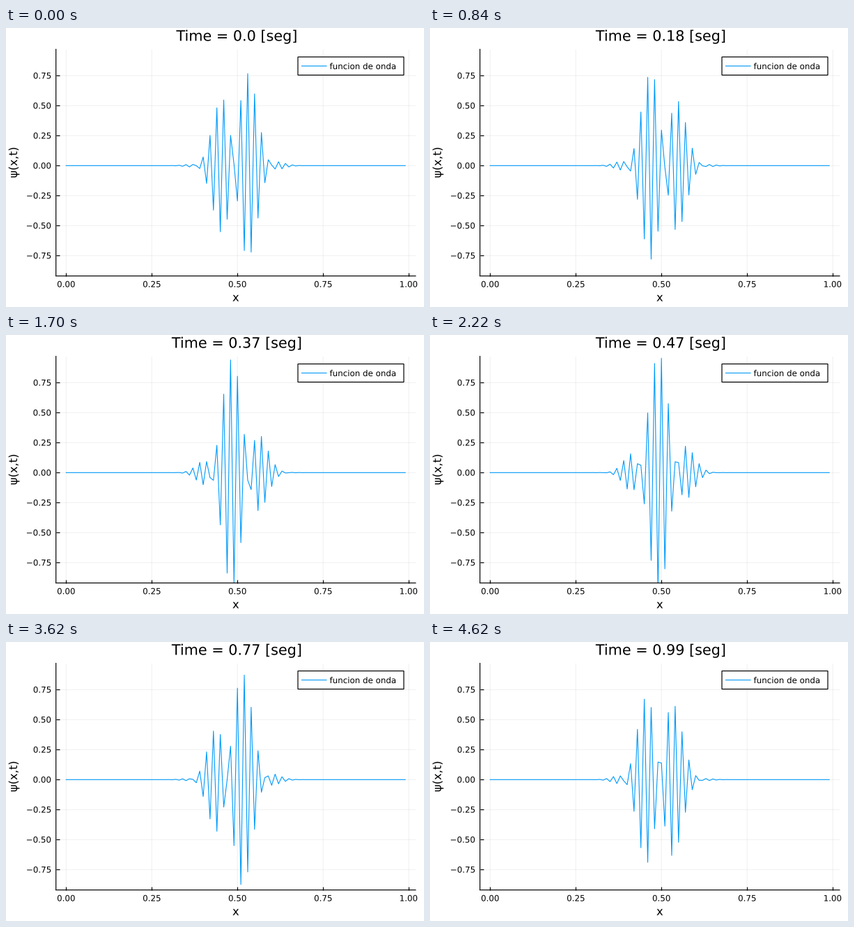
Recreate the animation shown at these times as a matplotlib script. Size 600x400 px, loop 4.64 s.

```python
import numpy as np
import matplotlib.pyplot as plt
from matplotlib.animation import FuncAnimation
from matplotlib.lines import Line2D
from matplotlib.patches import PathPatch, Rectangle
from matplotlib.textpath import TextPath
from matplotlib.transforms import Affine2D

W, H, DPI = 600, 400, 100
PX = 72 / DPI  # points per pixel
BLUE = "#009afa"
TICK_SIZE, GUIDE_SIZE, TITLE_SIZE = 11.85, 16.3, 20.75

# Plot box and data scale, in pixels
LEFT, RIGHT, TOP, BOTTOM = 71.7, 587.9, 30.5, 355.5
X0, X_SCALE = 86.3, 491.8
Y0, Y_SCALE = 197.3, 172.0

# Wave packet, in grid steps and seconds
CENTER, SIGMA = 50, 5.0
WAVENUMBER = np.pi + 0.288
PHASE, OMEGA = 1.87, 3.333
DRIFT, CHIRP = -0.7, -0.0019

plt.rcParams["font.family"] = "DejaVu Sans"
plt.rcParams["path.snap"] = False
n = np.arange(100)
x = n / 100


def wave(t):
    m = n - CENTER
    d = m - DRIFT * t
    angle = WAVENUMBER * m + PHASE - OMEGA * t + CHIRP * t * d**2
    return np.exp(-d**2 / (2 * SIGMA**2)) * np.cos(angle)


def text_path(px, py, s, size, align=0.5, angle=0):
    """Outline of s; align 0, 0.5 or 1 puts its left, middle or right at px."""
    path = TextPath((0, 0), s, size=size)
    box = path.get_extents()
    shift = box.x0 + align * box.width
    place = Affine2D().translate(-shift, 0).rotate_deg(angle).translate(px, H - py)
    return place.transform_path(path)


def label(*args, **kw):
    patch = PathPatch(text_path(*args, **kw), facecolor="black", linewidth=0,
                      transform=pixels, zorder=4)
    return fig.add_artist(patch)


fig = plt.figure(figsize=(W / DPI, H / DPI), dpi=DPI, facecolor="white")
pixels = Affine2D().scale(1 / W, 1 / H) + fig.transFigure

ax = fig.add_axes([LEFT / W, 1 - BOTTOM / H, (RIGHT - LEFT) / W, (BOTTOM - TOP) / H])
ax.set_xlim((LEFT - X0) / X_SCALE, (RIGHT - X0) / X_SCALE)
ax.set_ylim((Y0 - BOTTOM) / Y_SCALE, (Y0 - TOP) / Y_SCALE)
ax.set_axisbelow(True)
ax.spines[["top", "right"]].set_visible(False)
ax.spines[["left", "bottom"]].set_linewidth(1.2 * PX)

x_ticks = np.arange(0, 1.01, 0.25)
y_ticks = np.arange(-0.75, 0.76, 0.25)
ax.set_xticks(x_ticks)
ax.set_yticks(y_ticks)
ax.tick_params(direction="in", length=5 * PX, width=1.2 * PX,
               labelbottom=False, labelleft=False)
ax.grid(color="black", alpha=0.06, linewidth=1 * PX)

for v in x_ticks:
    label(X0 + v * X_SCALE, 371.5, f"{v:.2f}", TICK_SIZE)
for v in y_ticks:
    label(64.2, Y0 - v * Y_SCALE + 4.3, f"{v:.2f}".replace("-", "\u2212"),
          TICK_SIZE, align=1)
label(329.8, 391.7, "x", GUIDE_SIZE)
label(16, 193, "ψ(x,t)", GUIDE_SIZE, angle=90)


def title_path(t):
    return text_path(330.5, 18.4, f"Time = {t} [seg]", TITLE_SIZE)


title = fig.add_artist(PathPatch(title_path(0.0), facecolor="black", linewidth=0,
                                 transform=pixels))
curve, = ax.plot(x, wave(0), color=BLUE, linewidth=1.1 * PX)

# Legend
fig.add_artist(Rectangle((419, H - 67.5), 152, 26, transform=pixels,
                         facecolor="white", edgecolor="black",
                         linewidth=1.2 * PX, zorder=3))
fig.add_artist(Line2D([424.5, 460], [H - 54.5] * 2, transform=pixels,
                      color=BLUE, linewidth=1.1 * PX, zorder=4))
label(464.8, 59, "funcion de onda", TICK_SIZE, align=0)

# Every third step is held five ticks, the others one
steps = np.repeat(n, np.where(n % 3 == 1, 5, 1))


def update(tick):
    t = int(steps[tick]) / 100
    curve.set_ydata(wave(t))
    title.set_path(title_path(t))
    return curve, title


anim = FuncAnimation(fig, update, frames=len(steps), interval=20,
                     repeat=True, cache_frame_data=False)
plt.show()
```
